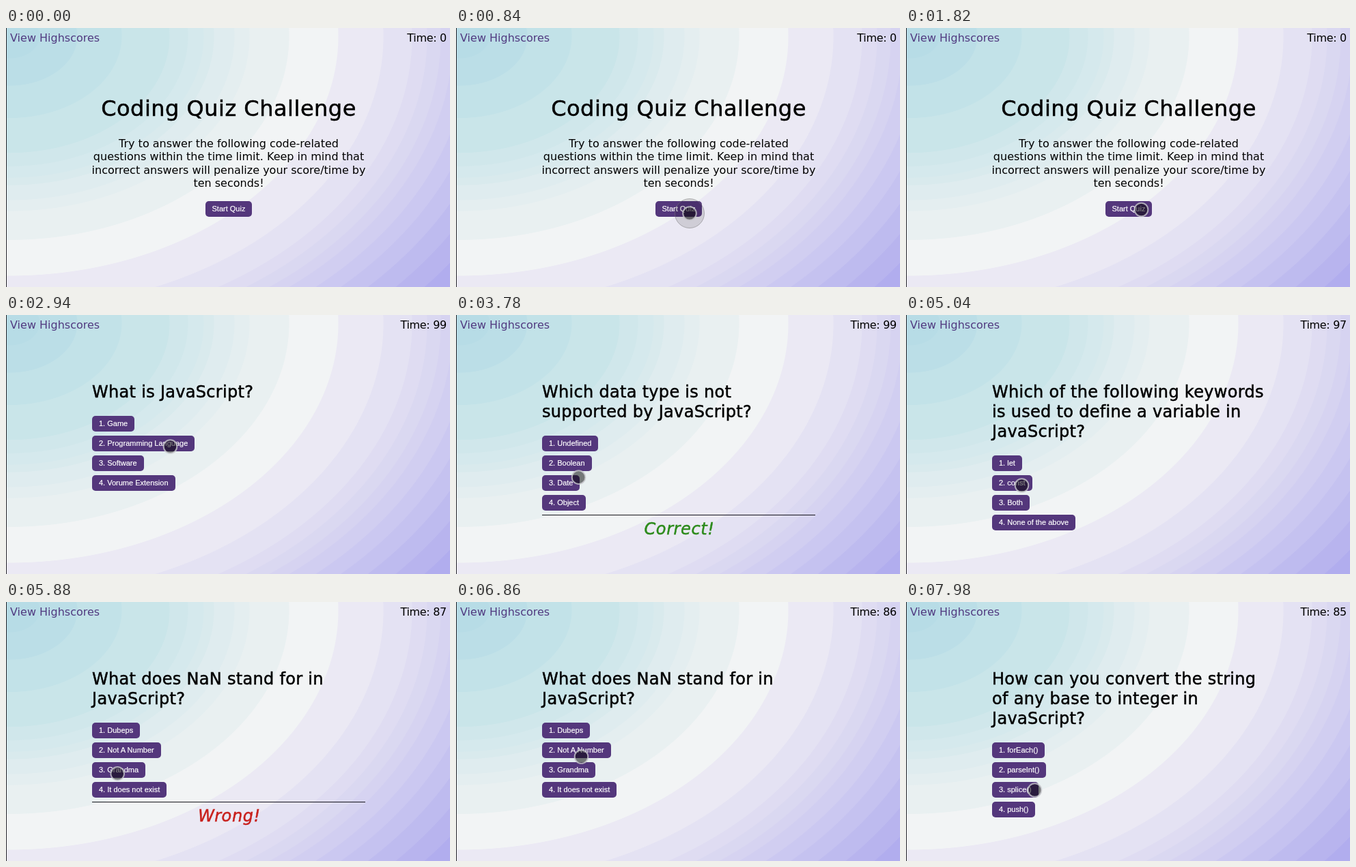
These frames come from a looping animation (650x380 px, 8000 ms). An HTML page:

```html
<!DOCTYPE html>
<html lang="en">
<head>
<meta charset="utf-8">
<title>Coding Quiz</title>
<style>
  html, body { margin: 0; width: 100%; height: 100%; overflow: hidden; }
  #stage { position: relative; width: 650px; height: 380px; overflow: hidden;
    color: #000; font: 16px/19.5px "DejaVu Sans", sans-serif; }
  #stage * { position: absolute; margin: 0; white-space: nowrap; }
  #stage br { position: static; }
  #edge { left: 0; top: 0; width: 1px; height: 380px; background: #25242a; }
  #scores { left: 6px; top: 5px; line-height: 19px; color: #513a80; }
  #clock { right: 5px; top: 5px; line-height: 19px; letter-spacing: -.3px; }
  h1, h2, .note { font-weight: 400; -webkit-text-stroke: .5px; }
  h1 { left: 0; width: 652px; top: 99px; text-align: center; font-size: 32px; line-height: 39px; letter-spacing: .5px; }
  h2 { left: 126px; top: 99px; font-size: 24px; line-height: 29px; letter-spacing: .3px; }
  p { left: 0; width: 652px; top: 159.5px; text-align: center; }
  .btn { height: 23px; padding: 0 10px; border-radius: 5px; background: #54377c; color: #fff;
    font: 11px/23px "Liberation Sans", Arial, sans-serif; -webkit-text-stroke: .2px; }
  .rule { left: 126px; width: 400px; height: 1px; background: #17161c; }
  .note { left: 126px; width: 402px; text-align: center; font-size: 24px; line-height: 29px;
    font-style: italic; letter-spacing: .6px; }
  svg { left: 0; top: 0; }
</style>
</head>
<body>
<div id="stage">
  <div id="edge"></div>
  <div id="scores">View Highscores</div>
  <div id="clock"></div>
  <div id="screen"></div>
  <svg width="650" height="380">
    <circle id="ring" r="21.5" fill="#000" fill-opacity=".12" stroke="#777" stroke-opacity=".5"/>
    <circle id="dot" r="9.8" fill="#000" fill-opacity=".5" stroke="#c8c8cd" stroke-opacity=".8" stroke-width="2"/>
  </svg>
</div>
<script>
const LOOP = 8000, STEP = 70;
const $ = id => document.getElementById(id);

// Outer radius and colour of each elliptical band
const bands = [
  [45, '#b7dce6'], [100, '#bbdee7'], [165, '#c2e2e8'], [235, '#c9e5e9'],
  [262, '#d0e7eb'], [285, '#d5e9ed'], [300, '#d9eaed'], [330, '#dfecef'],
  [352, '#e4eef0'], [410, '#e9f0f1'], [482, '#f2f4f5'], [548, '#ebe9f4'],
  [590, '#e4e2f3'], [612, '#dfdcf2'], [632, '#dad8f1'], [650, '#d6d3f1'],
  [675, '#d1cef1'], [700, '#cbc8f1'], [728, '#c5c2f0'], [758, '#bebbef'],
  [790, '#b8b4ee'], [1000, '#b1adee']
];
let inner = 0;
const stops = bands.map(([r, color]) => {
  const stop = `${color} ${inner}px ${r - 1}px`;
  inner = r;
  return stop;
});
$('stage').style.background = `radial-gradient(1000px 730px at 5px 12px, ${stops})`;

const quiz = [
  ['What is JavaScript?', 'Game', 'Programming Language', 'Software', 'Vorume Extension'],
  ['Which data type is not<br>supported by JavaScript?', 'Undefined', 'Boolean', 'Date', 'Object'],
  ['Which of the following keywords<br>is used to define a variable in<br>JavaScript?',
    'let', 'const', 'Both', 'None of the above'],
  ['What does NaN stand for in<br>JavaScript?', 'Dubeps', 'Not A Number', 'Grandma', 'It does not exist'],
  ['How can you convert the string<br>of any base to integer in<br>JavaScript?',
    'forEach()', 'parseInt()', 'splice()', 'push()']
];
const noteColors = { 'Correct!': '#2b8a1a', 'Wrong!': '#c8201c' };

// start, question (-1 = welcome), seconds left, feedback
const states = [
  [0, -1, 0], [1890, 0, 100], [2870, 0, 99],
  [3010, 1, 99, 'Correct!'], [3990, 1, 98, 'Correct!'],
  [4060, 2, 98, 'Correct!'], [5040, 2, 97],
  [5250, 3, 87, 'Wrong!'], [6020, 3, 86, 'Wrong!'], [6160, 3, 86], [7070, 3, 85],
  [7140, 4, 85, 'Correct!'], [7560, 4, 85]
];

// start, end, from x y, bend x y, to x y
const moves = [
  [70, 380, 171, 123, 460, 123, 502, 235],
  [380, 700, 502, 235, 450, 400, 342, 272],
  [1050, 1260, 342, 272, 343, 269, 344.5, 266.5],
  [2170, 2520, 344.5, 266.5, 290, 222, 240.5, 193],
  [3080, 3920, 240.5, 193, 196, 222, 176.5, 241],
  [4060, 4410, 176.5, 241, 173, 247, 169.5, 250],
  [5320, 5530, 169.5, 250, 170, 268, 160, 278],
  [5670, 5950, 160, 278, 160, 262, 164.5, 247],
  [6440, 6860, 164.5, 247, 172, 234, 183.5, 227],
  [7700, 7980, 183.5, 227, 182, 250, 188.5, 276]
];
const clicks = [[840, 140], [1680, 140], [2870, 70], [3990, 70], [5110, 70], [7000, 70]];

const button = (x, y, label) => `<div class="btn" style="left:${x}px;top:${y}px">${label}</div>`;

function welcome() {
  return `<h1>Coding Quiz Challenge</h1>
    <p>Try to answer the following code-related<br>questions within the time limit. Keep in mind that<br>
    incorrect answers will penalize your score/time by<br>ten seconds!</p>` + button(291.5, 254, 'Start Quiz');
}

function question([title, ...answers], note) {
  const top = 119 + 29 * title.split('<br>').length;
  let html = `<h2>${title}</h2>`;
  answers.forEach((text, i) => { html += button(126, top + 29 * i, `${i + 1}. ${text}`); });
  if (note) {
    html += `<div class="rule" style="top:${top + 116}px"></div>
      <div class="note" style="top:${top + 123}px;color:${noteColors[note]}">${note}</div>`;
  }
  return html;
}

function cursorAt(t) {
  const move = moves.filter(m => m[0] <= t).pop();
  if (!move) return null;
  const [start, end, x0, y0, cx, cy, x1, y1] = move;
  const k = Math.min(1, (t - start) / (end - start));
  const u = k * k * (3 - 2 * k), v = 1 - u;
  const bend = (a, b, c) => v * v * a + 2 * u * v * b + u * u * c;
  return [bend(x0, cx, x1), bend(y0, cy, y1)];
}

let shown = null;
function draw(time) {
  const t = Math.floor((time % LOOP) / STEP) * STEP;
  const state = states.filter(s => s[0] <= t).pop();
  if (state !== shown) {
    shown = state;
    const [, index, seconds, note] = state;
    $('clock').textContent = `Time: ${seconds}`;
    $('screen').innerHTML = index < 0 ? welcome() : question(quiz[index], note);
  }
  const pos = cursorAt(t);
  const pressed = clicks.some(([at, length]) => t >= at && t < at + length);
  $('dot').style.display = pos ? '' : 'none';
  $('ring').style.display = pos && pressed ? '' : 'none';
  if (pos) {
    for (const id of ['dot', 'ring']) {
      $(id).setAttribute('cx', pos[0]);
      $(id).setAttribute('cy', pos[1]);
    }
  }
}

const begin = performance.now();
function tick() {
  draw(performance.now() - begin);
  requestAnimationFrame(tick);
}
tick();
</script>
</body>
</html>
```
